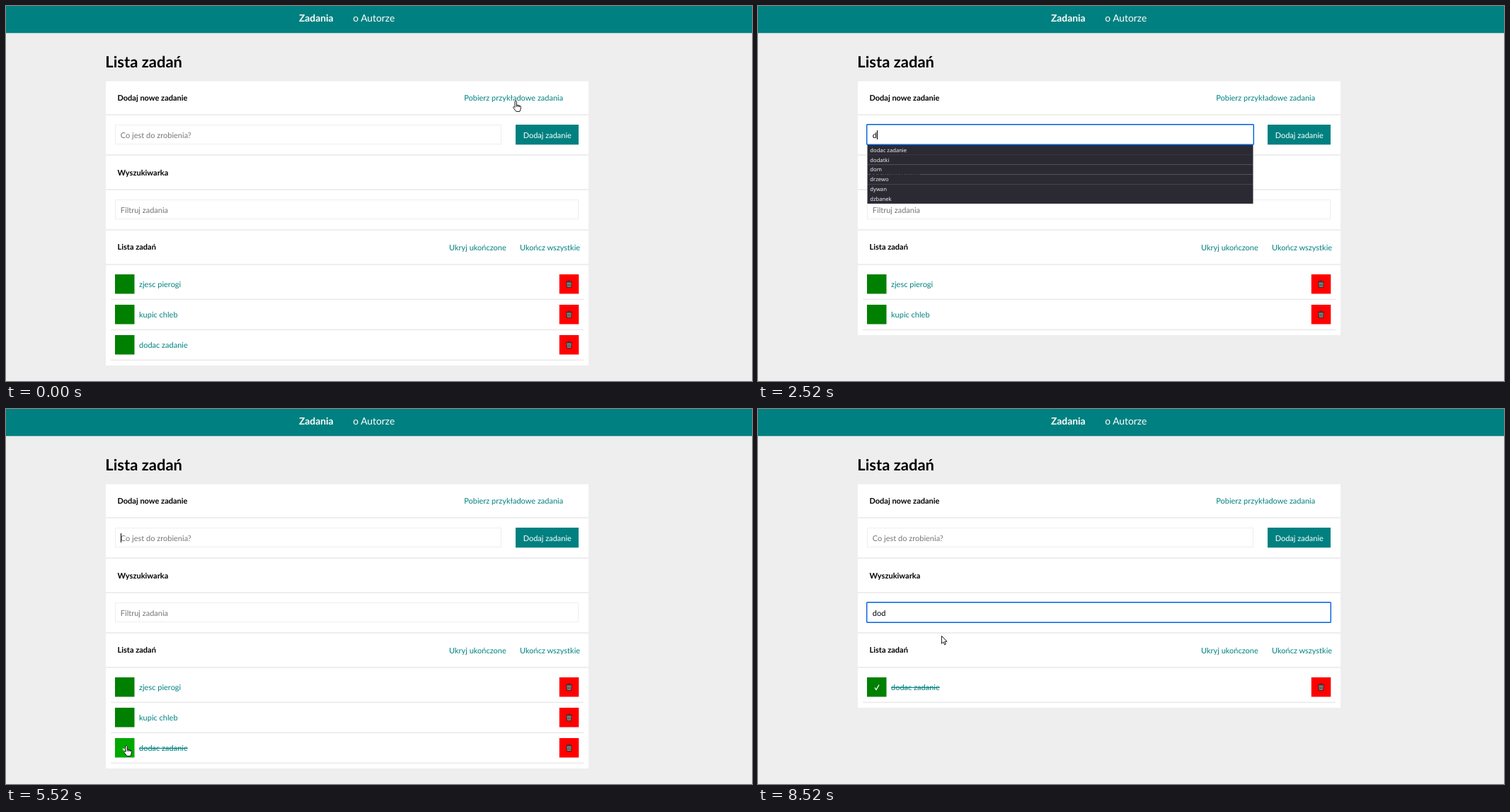
Write an HTML page that moves like this. It is 1054 px wide and 531 px high and loops after 8560 ms.

```html
<!DOCTYPE html>
<html lang="pl">
<head>
<meta charset="utf-8">
<title>Lista zadań</title>
<style>
  html, body { margin: 0; width: 100%; height: 100%; overflow: hidden; background: #eee; }
  svg { display: block; width: 1054px; height: 531px; font: 11px Lato, sans-serif; }
  text { white-space: pre; text-rendering: geometricPrecision; }
  .bold { font-weight: 700; }
  .nav { font-size: 13.8px; fill: #fff; }
  .title { font-size: 22px; font-weight: 700; }
  .link { fill: teal; }
  .done { fill: teal; text-decoration: line-through; }
  .hint { fill: #757575; }
  .light { fill: #fff; }
  .option { font: 7.7px "Open Sans", sans-serif; fill: #fbfbfe; }
  .middle { text-anchor: middle; }
</style>
</head>
<body>
<svg id="stage" viewBox="0 0 1054 531"></svg>
<script>
const LOOP = 8560, BLINK = 530, LEFT = 141, WIDTH = 682, INSET = 154, BOX = 27.5;
const stage = document.getElementById('stage');
const pen = document.createElement('canvas').getContext('2d');
pen.font = '11px Lato, sans-serif';
pen.textRendering = 'geometricPrecision';

const FETCH = 130, FETCHED = 1470, FOCUS_NEW = 1770, TYPE_NEW = 2430, SUBMIT = 3930,
      REAPPEAR = 4290, CHECKED = 5370, FOCUS_FILTER = 6190, TYPE_FILTER = 6840, LEAVE = 8400;
const NEW_TASK = 'dodac zadanie';
const history = [NEW_TASK, 'dodatki', 'dom', 'drzewo', 'dywan', 'dzbanek'];

// Pointer moves, each starting where the last one ended
const moves = [
  { from: 150, to: 540, x: 459, y: 201 },
  { from: 1400, to: 1840, x: 379, y: 185.5 },
  { from: REAPPEAR, to: 4330, x: 390, y: 234 },
  { from: 4470, to: 5250, x: 170, y: 477 },
  { from: 5540, to: 6180, x: 267, y: 291 },
  { from: LEAVE, to: 8520, x: 259, y: 321 }
];

const rect = (x, y, w, h, fill, extra = '') =>
  `<rect x="${x}" y="${y}" width="${w}" height="${h}" fill="${fill}" ${extra}/>`;
const text = (x, y, str, cls = '') => `<text x="${x}" y="${y}" class="${cls}">${str}</text>`;
const path = (d, extra) => `<path d="${d}" ${extra}/>`;
const group = (x, y, body) => `<g transform="translate(${x} ${y})">${body}</g>`;
const typed = (str, start, step, t) => str.slice(0, Math.max(0, Math.floor((t - start) / step) + 1));
const blink = (t, since) => Math.floor((t - since) / BLINK) % 2 === 1;
const inBox = (p, x, y, w, h) => p.x >= x && p.x < x + w && p.y >= y && p.y < y + h;
const sectionTop = i => 106.5 + 105.8 * i;
const rowTop = i => 380 + 43 * i;

function pointerAt(t) {
  return moves.reduce((p, m) => {
    const u = Math.min(1, Math.max(0, (t - m.from) / (m.to - m.from)));
    const ease = u * u * (3 - 2 * u);
    return { x: p.x + (m.x - p.x) * ease, y: p.y + (m.y - p.y) * ease };
  }, { x: 720, y: 135 });
}

function newCaret(t) {
  if (t < FOCUS_NEW) return blink(t, -150);
  if (t < TYPE_NEW) return blink(t, FOCUS_NEW - BLINK);
  return t < SUBMIT || t < FOCUS_FILTER && blink(t, SUBMIT);
}

function input(y, w, value, hint, focused, caret) {
  const frame = focused
    ? rect(INSET - .3, y - .3, w + .6, 28.6, '#fff', 'stroke="#0060df" stroke-width="1.4" rx="1"')
    : rect(INSET + .5, y + .5, w - 1, 27, '#fff', 'stroke="#eee"');
  const caretX = Math.round(161.8 + pen.measureText(value).width);
  return frame + text(161.8, y + 18.6, value || hint, value ? '' : 'hint') +
    (caret ? rect(caretX, y + 8, 1, 13, '#000') : '');
}

function section(title, i) {
  const top = sectionTop(i);
  return text(157.5, top + 27.2, title, 'bold') +
    [46.5, 103.5].slice(0, i < 2 ? 2 : 1).map(d => rect(LEFT, Math.round(top + d), WIDTH, 2, '#eee')).join('');
}

function bin(x, y) {
  return rect(x, y, BOX, BOX, 'red') + group(x + 9, y + 8.5,
    path('M1 2.5H8.4L7.7 10H1.8Z', 'fill="#8b9a9a" stroke="#2b2222" stroke-width=".9"') +
    path('M.4 1.8H9M3 .6H6.4M3.4 4L3.7 8.6M6 4L5.8 8.6', 'stroke="#3a3030" fill="none"'));
}

function task({ name, done }, i, pointer) {
  const y = rowTop(i);
  const hover = pointer && inBox(pointer, INSET, y, BOX, BOX);
  return rect(INSET, y, BOX, BOX, hover ? '#00a800' : 'green') +
    (done ? path(`M165 ${y + 14.5}l2 3 4-7`, 'fill="none" stroke="#fff" stroke-width="1.3"') : '') +
    text(188, y + 17.8, name, done ? 'done' : 'link') + bin(781.8, y) +
    rect(148, y + 34.6, 668, 1.6, '#eaeaea');
}

function suggestions(value) {
  const rows = history.filter(h => value && h.startsWith(value));
  return rows.map((r, i) => rect(154.5, 197 + 13.8 * i, 545, 13.9, '#2b2a33') +
    text(158.3, 206.8 + 13.8 * i, r, 'option')).join('');
}

function drawPointer(p) {
  const overLink = inBox(p, 647, 122, 140, 16) || inBox(p, INSET, rowTop(2), BOX, BOX);
  const overInput = inBox(p, INSET, 168, 546, 28) || inBox(p, INSET, 274, 655, 28);
  const ink = 'fill="#fff" stroke="#000" stroke-width=".9" stroke-linejoin="round"';
  let shape = path('M.4.4V11.2L2.9 8.9 4.6 12.8 6.4 12 4.7 8.2H8Z', ink);
  if (overLink) {
    shape = group(-4, -1,
      path('M3 9.5V1.7a1.2 1.2 0 0 1 2.4 0V6.2l4.4 1q1.7.4 1.6 2l-.4 3.2-1.1 3H4.8L1 10.4q-.8-1.4.4-1.8 .9-.2 1.6.9Z', ink) +
      path('M5.4 6.2V8.8M7.5 6.8V9M9.5 7.2V9.2', ink));
  } else if (overInput) {
    shape = path('M-3-5.5q2 0 3 1q1-1 3-1M0-4.5V4.5M-3 5.5q2 0 3-1q1 1 3 1', 'fill="none" stroke="#222"');
  }
  return group(p.x.toFixed(1), p.y.toFixed(1), shape);
}

function scene(t) {
  const hidden = t >= TYPE_NEW && t < REAPPEAR || t >= TYPE_FILTER && t < LEAVE;
  const pointer = hidden ? null : pointerAt(t);
  const draft = t < SUBMIT ? typed(NEW_TASK, TYPE_NEW, 120, t) : '';
  const query = typed('dod', TYPE_FILTER, 110, t);
  const tasks = [{ name: 'zjesc pierogi' }, { name: 'kupic chleb' }];
  if (t < FETCHED || t >= SUBMIT) tasks.push({ name: NEW_TASK, done: t >= CHECKED });
  const visible = tasks.filter(({ name }) => name.includes(query));
  const loading = t >= FETCH && t < FETCHED;

  return [
    rect(0, 0, 1054, 531, '#eee'),
    rect(0, 0, 1054, 38.3, 'teal'),
    text(414, 22.3, 'Zadania', 'nav bold'),
    text(490.3, 22.3, 'o Autorze', 'nav'),
    text(140.3, 86.8, 'Lista zadań', 'title'),
    rect(LEFT, 106.5, WIDTH, rowTop(visible.length) - 106.5, '#fff'),
    ...['Dodaj nowe zadanie', 'Wyszukiwarka', 'Lista zadań'].map(section),
    text(717.2, 133.7, loading ? 'Ładowanie...' : 'Pobierz przykładowe zadania', 'link middle'),
    text(626, 345.5, 'Ukryj ukończone', 'link'),
    text(726, 345.5, 'Ukończ wszystkie', 'link'),
    input(168, 546, draft, 'Co jest do zrobienia?', t >= FOCUS_NEW && t < CHECKED, newCaret(t)),
    rect(720, 168, 89, 28.3, 'teal'),
    text(764.8, 186.6, 'Dodaj zadanie', 'light middle'),
    input(274, 655, query, 'Filtruj zadania', t >= FOCUS_FILTER, t >= FOCUS_FILTER && blink(t, FOCUS_FILTER)),
    ...visible.map((item, i) => task(item, i, pointer)),
    suggestions(draft),
    pointer ? drawPointer(pointer) : ''
  ].join('');
}

let shown = '';
function tick() {
  const next = scene(performance.now() % LOOP);
  if (next !== shown) stage.innerHTML = shown = next;
  requestAnimationFrame(tick);
}
tick();
</script>
</body>
</html>
```
